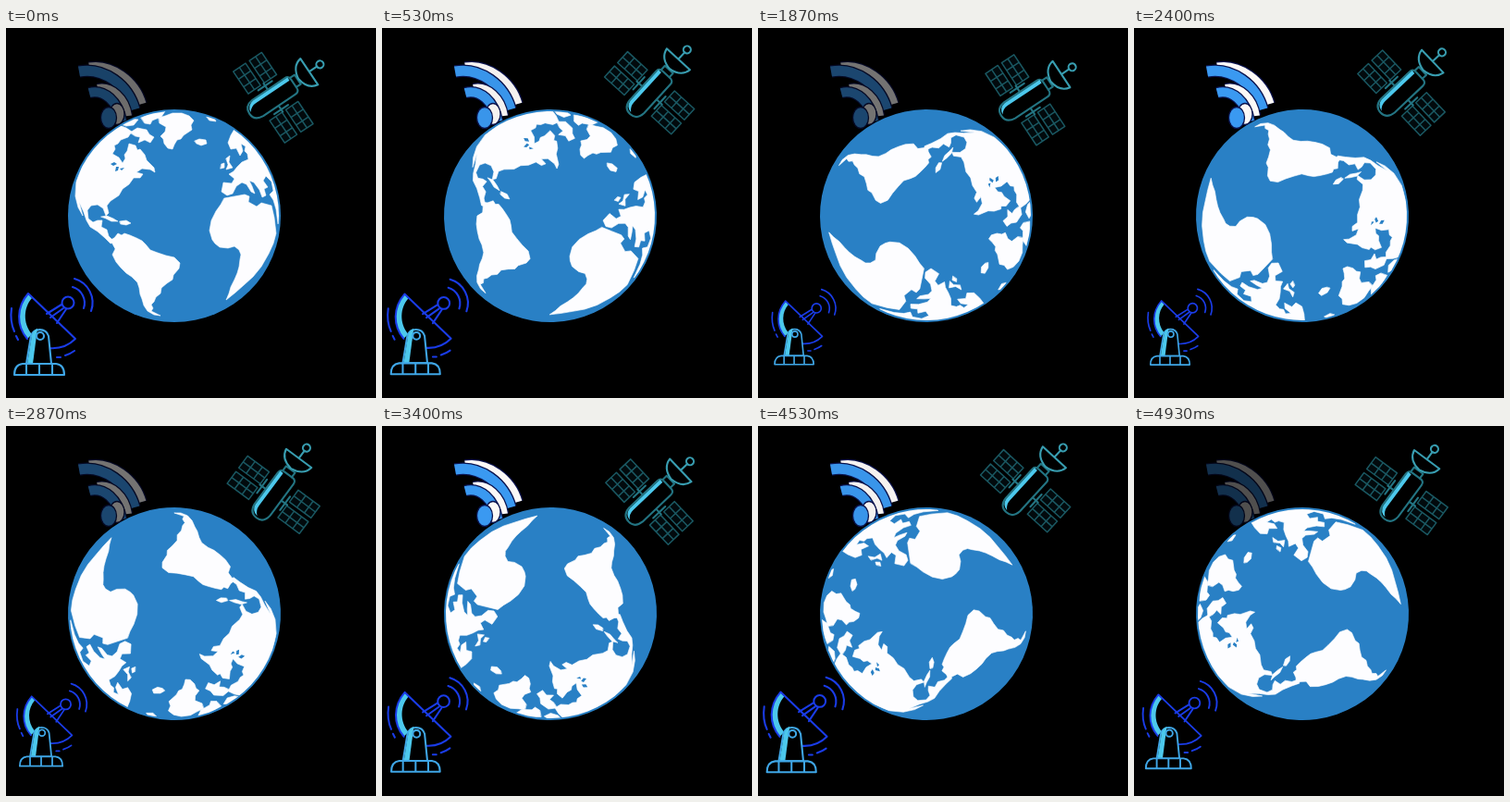
Recreate the animation shown at these times as an HTML page. Size 400x400 px, loop 4990 ms.

```html
<!DOCTYPE html>
<html lang="en">
<head>
<meta charset="utf-8">
<title>Satellite link</title>
<style>
  html, body { margin: 0; height: 100%; overflow: hidden; background: #000; }
  svg { display: block; width: 100%; height: 100%; }
  path, rect, circle, ellipse { stroke-linejoin: round; stroke-linecap: round; }
  .sea { fill: #2980c5; }
  .land { fill: #fdfdff; stroke: #fdfdff; stroke-width: .6; }
  .line { fill: none; stroke-width: 2.1; }
  .blue { stroke: #1a3ce8; }
  .sky { stroke: #3fa6e6; }
  .dim { stroke: #237482; }
  .pale { stroke: #389db0; }
  .glow { fill: #4cc8ec; }
  .panel { fill: #020a0d; stroke: #1a5862; stroke-width: 1.5; }
</style>
</head>
<body>
<svg viewBox="0 0 400 400">
  <defs><clipPath id="disc"><circle cx="182" cy="203" r="113"/></clipPath></defs>

  <g id="globe">
    <circle class="sea" cx="182" cy="203" r="115"/>
    <g class="land" clip-path="url(#disc)">
      <!-- North America -->
      <path d="M76 166L84 145 98 125 112 112 122 105 130 108 136 112 132 118 124 121 121 125 117 127 118 131 115 136 122 140 126 146 129 141 128 137 131 133 133 125 140 127 142 132 145 131 150 137 152 143 160 151 161 156 156 153 147 152 141 156 148 158 145 162 138 162 133 169 126 174 122 181 113 187 109 192 111 200 108 203 105 195 99 191 92 192 88 197 89 206 94 210 99 208 104 208 103 215 109 218 111 225 115 229 119 226 118 231 113 233 107 227 99 220 91 215 87 208 84 199 79 188 83 203 78 194 75 182Z"/>
      <path d="M134 113L142 108 152 110 155 115 160 118 156 124 150 121 143 124 145 118 140 117ZM125 104L135 98 143 99 138 105 130 106ZM146 97L158 92 172 90 168 96 158 100 156 104 150 103Z"/>
      <!-- Greenland, Iceland, Arctic -->
      <path d="M165 97L172 95 180 92 190 92 198 95 203 100 200 105 201 110 192 116 189 120 185 121 182 126 180 131 175 130 171 125 170 120 167 117 172 112 173 107 166 103ZM204 122L209 120 216 121 217 125 211 127 206 125ZM217 96L225 97 227 101 220 100Z"/>
      <!-- Caribbean -->
      <path d="M103 204L109 203 116 206 121 209 114 209 108 206ZM123 209L130 208 135 211 130 213 124 212Z"/>
      <!-- South America -->
      <path d="M113 229L117 227 121 222 125 224 128 222 134 224 141 227 147 230 151 234 156 240 164 243 173 246 182 248 188 254 187 260 181 267 180 272 174 276 168 281 167 287 162 291 160 296 157 299 159 303 157 306 161 308 167 311 160 310 153 306 149 300 147 293 145 288 144 281 142 275 136 269 130 265 124 259 119 253 115 245 118 239Z"/>
      <!-- Eurasia -->
      <path d="M249 106L243 116 240 124 243 131 249 130 253 138 256 133 254 125 259 128 258 133 261 136 262 142 255 145 250 150 246 155 241 158 247 163 244 168 235 167 233 177 239 181 245 179 249 171 255 167 260 169 265 177 269 179 266 171 263 165 268 167 274 175 277 183 281 181 279 174 283 172 278 165 281 160 287 166 289 176 285 180 289 186 292 196 294 212 299 205 299 175 288 145 270 120Z"/>
      <path d="M238 141L242 138 241 145 245 151 238 153 240 148ZM233 147L236 146 236 151 232 152Z"/>
      <!-- Africa -->
      <path d="M236 184L247 182 258 180 263 182 262 188 271 193 276 189 287 192 290 205 292 222 289 233 284 244 276 258 267 269 257 278 248 286 238 294 241 287 243 280 247 272 250 265 252 258 253 250 254 245 252 240 247 236 240 238 231 237 226 233 223 229 220 219 222 208 227 198 232 191Z"/>
    </g>
    <path class="sea" d="M113 147l4-2 3 2-4 2zM119 150l3 0-1 4-3 1zM123 152l5-1-3 3z"/>
  </g>

  <g id="wifi"></g>

  <g id="dish" class="line">
    <path class="glow" d="M24 287C11 302 11 322 23 336L28 331C18 319 19 302 28 292Z"/>
    <path class="blue" d="M23 336C11 322 11 302 24 287L75 336C66 345 56 347 46 346M44 309L60 299M48 313L62 303M55 319L65 304"/>
    <circle class="blue" cx="67" cy="297" r="6.5"/>
    <path class="blue" d="M72 280A18 18 0 0 1 84 303M74 271A27 27 0 0 1 92 306M6 303Q4 317 9 328M11 333l2 4M55 356l4 0M64 354Q70 352 74 349"/>
    <path class="sky" fill="#000" d="M22 363L27 333A10 10 0 0 1 46 333L49 363Z"/>
    <path class="glow" d="M23 363L28 332Q30 326 34 325L29 363Z"/>
    <circle class="sky" cx="37" cy="333" r="4"/>
    <path class="sky" fill="#000" d="M9 375Q9 364 18 363H54Q63 364 63 375ZM22 363V375M36 363V375M50 363V375"/>
  </g>

  <g id="sat" class="line">
    <g id="panels"></g>
    <path class="dim" d="M-9 -14H9M0 -17V-9M-9 17H9M0 20V12"/>
    <path class="dim" fill="#000" d="M-20 -9H22Q27 -9 27 -4V7Q27 12 22 12H-20Q-31 11 -31 1.5Q-31 -8 -20 -9Z"/>
    <path class="glow" d="M25 -8H-20Q-28 -7 -29 1Q-25 -4 -19 -4H25Z"/>
    <path class="dim" d="M27 -6H33V6H27"/>
    <path class="pale" d="M48 -17Q36 -15 34 0Q36 15 48 17ZM48 0H58"/>
    <circle class="pale" cx="62" cy="0" r="4"/>
  </g>
</svg>
<script>
const $ = id => document.getElementById(id);
const TAU = Math.PI * 2;

// Solar panels: a frame with a 2 x 3 grid
const panel = (x, y) =>
  `<path class="panel" d="M${x} ${y}h16v29h-16zm8 0v29m-8-19h16m-16 10h16"/>`;
$('panels').innerHTML = [[-20, -46], [1, -46], [-17, 20], [4, 20]].map(p => panel(...p)).join('');

// Signal icon: white sides behind blue faces, all with dark edges
const WHITE = '#fdfaf8', BLUE = '#3b9af2', EDGE = '#0b1450';
const band = (d, color, w) =>
  [[EDGE, w + 2.5], [color, w]].map(([c, width]) =>
    `<path d="${d}" fill="none" stroke="${c}" stroke-width="${width}" style="stroke-linecap:butt"/>`).join('');
const spot = (x, y, rx, color) =>
  `<ellipse cx="${x}" cy="${y}" rx="${rx}" ry="11.5" fill="${color}" stroke="${EDGE}" stroke-width="1.3"/>`;
$('wifi').innerHTML =
  band('M90 42C114 38 140 57 147 82', WHITE, 9) +
  band('M79 47C106 42 132 62 139 88', BLUE, 11) +
  band('M99 65C114 62 129 75 132 95', WHITE, 8) +
  band('M90 70C106 66 121 79 125 101', BLUE, 10) +
  spot(120, 93, 8, WHITE) + spot(111, 97, 8.5, BLUE);

function draw(now) {
  // 15 pictures per second on a 10 ms clock
  const step = Math.floor((Math.floor(now % 4990 / 10) + .5) * .15);
  const t = step / 15;

  $('globe').setAttribute('transform', `rotate(${60 * t} 182 203)`);

  const tilt = -43.5 + 10 * Math.cos(TAU * (t - 1.9) / 2);
  const lift = 75 + 6 * Math.sin(TAU * (t - .95) / 2);
  $('sat').setAttribute('transform', `translate(288 ${lift}) rotate(${tilt})`);

  const c = Math.cos(TAU * t / 4);
  const scale = .89 + .11 * c * (1.5 - .5 * c * c);
  $('dish').setAttribute('transform', `translate(50 324) scale(${scale}) translate(-50 -324)`);

  $('wifi').setAttribute('opacity', .3 + .7 * Math.abs(Math.sin(Math.PI * (t - .94))));
}

const start = performance.now();
(function loop() {
  draw(performance.now() - start);
  requestAnimationFrame(loop);
})();
</script>
</body>
</html>
```
